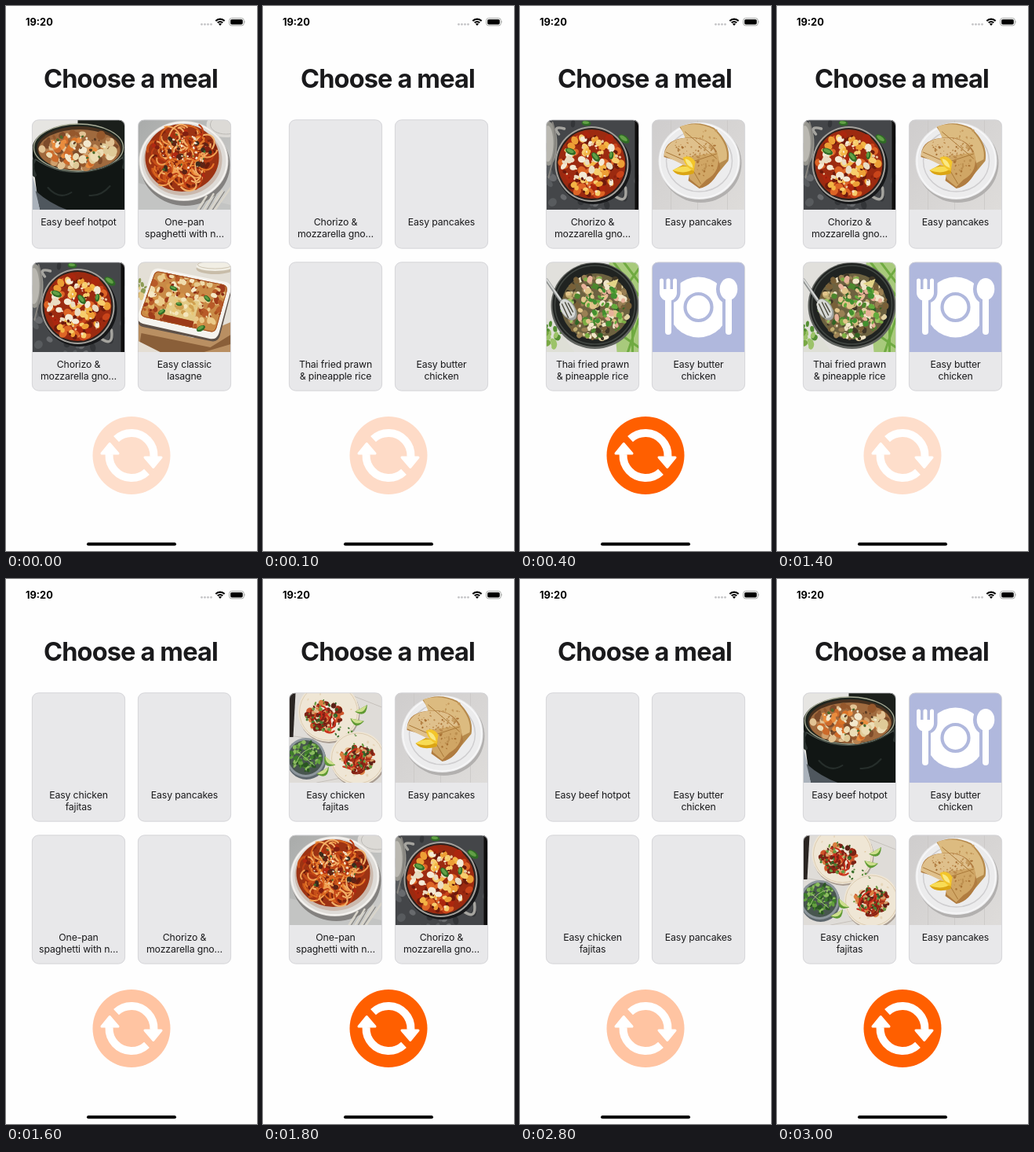
Write an HTML page with a canvas that moves like this. It is 320 by 693 pixels and loops after 3100 ms.

```html
<!DOCTYPE html>
<html lang="en">
<head>
<meta charset="utf-8">
<title>Choose a meal</title>
<style>
  html, body { margin: 0; width: 100%; height: 100%; overflow: hidden; background: #fefefe; }
  body { position: relative; font-family: Inter, "Liberation Sans", sans-serif; color: #1a1a1c; font-optical-sizing: none; }
  canvas { position: absolute; left: 0; top: 0; width: 320px; height: 693px; }
  div, h1 { position: absolute; margin: 0; text-align: center; }
  h1 { left: -1px; top: 73px; width: 320px; font-size: 32.5px; font-weight: 700; line-height: 40px; letter-spacing: -.85px; white-space: nowrap; }
  #clock { left: 25px; top: 11px; font-size: 12.8px; font-weight: 700; line-height: 20px; color: #000; }
  .cap { width: 119px; font-size: 12.3px; line-height: 15px; letter-spacing: -.14px; white-space: pre; }
</style>
</head>
<body>
<canvas id="stage"></canvas>
<div id="clock">19:20</div>
<h1>Choose a meal</h1>
<script>
const LOOP = 3100, STEP = 100, FADE = 250, LOAD = 170, DIM = 0.2;
const W = 320, H = 693, PIC_W = 118, PIC_H = 114, TAU = Math.PI * 2;
const SLOTS = [[33, 144.5], [168, 144.5], [33, 325.5], [168, 325.5]];

const canvas = document.getElementById('stage');
const ctx = canvas.getContext('2d');
const ratio = window.devicePixelRatio || 1;
canvas.width = W * ratio;
canvas.height = H * ratio;

let seed = 1;
function rnd(a = 0, b = 1) {
  seed = (seed * 1664525 + 1013904223) >>> 0;
  return a + (b - a) * seed / 4294967296;
}
const pick = list => list[Math.floor(rnd(0, list.length))];

function rect(x, y, w, h, color) {
  ctx.fillStyle = color;
  ctx.fillRect(x, y, w, h);
}
function backdrop(from, to) {
  const g = ctx.createLinearGradient(0, 0, PIC_W, PIC_H);
  g.addColorStop(0, from);
  g.addColorStop(1, to);
  rect(0, 0, PIC_W, PIC_H, g);
}
function oval(x, y, rx, ry, color, turn = 0) {
  ctx.fillStyle = color;
  ctx.beginPath();
  ctx.ellipse(x, y, rx, ry, turn, 0, TAU);
  ctx.fill();
}
function ring(x, y, rx, ry, color, width) {
  ctx.strokeStyle = color;
  ctx.lineWidth = width;
  ctx.beginPath();
  ctx.ellipse(x, y, rx, ry, 0, 0, TAU);
  ctx.stroke();
}
function shape(d, color) {
  ctx.fillStyle = color;
  ctx.fill(new Path2D(d));
}
function line(d, color, width) {
  ctx.strokeStyle = color;
  ctx.lineWidth = width;
  ctx.lineCap = ctx.lineJoin = 'round';
  ctx.stroke(new Path2D(d));
}
function round(x, y, w, h, r) {
  ctx.beginPath();
  ctx.roundRect(x, y, w, h, r);
}
function spot(rx, ry) {
  const a = rnd(0, TAU), d = Math.sqrt(rnd());
  return [Math.cos(a) * d * rx, Math.sin(a) * d * ry];
}
function scatter(n, x, y, rx, ry, colors, min, max) {
  for (let i = 0; i < n; i++) {
    const [dx, dy] = spot(rx, ry), r = rnd(min, max);
    oval(x + dx, y + dy, r, r * rnd(0.5, 0.95), pick(colors), rnd(0, 3));
  }
}
function strands(n, x, y, rx, ry, colors, width) {
  for (let i = 0; i < n; i++) {
    const [dx, dy] = spot(rx, ry), a = rnd(0, TAU), r = rnd(6, 17);
    ctx.strokeStyle = pick(colors);
    ctx.lineWidth = width;
    ctx.beginPath();
    ctx.ellipse(x + dx, y + dy, r, r * 0.75, rnd(0, 3), a, a + rnd(1.2, 3.2));
    ctx.stroke();
  }
}
function leaf(x, y, size, turn) {
  oval(x, y, size, size * 0.55, '#2f6b25', turn);
  oval(x - 0.5, y - 0.8, size * 0.7, size * 0.3, '#62a046', turn);
}
function lime(x, y, turn) {
  ctx.save();
  ctx.translate(x, y);
  ctx.rotate(turn);
  shape('M-9 -3 Q0 12 9 -3Z', '#5f9a33');
  shape('M-8 -3 Q0 6 8 -3Z', '#cfdf8e');
  ctx.restore();
}

function hotpot() {
  rect(0, 0, 118, 114, '#e6e5e2');
  shape('M58 0 H118 V40 Q96 8 58 5Z', '#1b1f1b');
  shape('M0 70 L12 114 H0Z', '#aab2bb');
  shape('M0 40 Q4 88 10 114 H118 V36Z', '#111614');
  shape('M4 90 L10 114 H44 Q22 106 4 90Z', '#4f575e');
  line('M2 52 Q-3 58 3 70 M114 44 Q121 50 117 60', '#2a322f', 5);
  oval(59, 36, 59, 31, '#20261f');
  ring(59, 35, 57, 30, '#a9ad98', 1.3);
  oval(60, 36, 54, 28, '#48311f');
  oval(60, 38, 52, 26, '#a06a3e');
  scatter(90, 60, 38, 48, 23, ['#b98352', '#d0a06c', '#7d4b2a', '#e2c394', '#95582c'], 2, 6);
  scatter(22, 60, 40, 43, 18, ['#da7327', '#e98c3d', '#cd6a2a'], 3.5, 6.5);
  scatter(20, 60, 40, 43, 18, ['#ecdcb4', '#dfca98', '#f3e8cd'], 4, 7);
  scatter(30, 60, 36, 40, 18, ['#5a3a22', '#4c6b2c', '#f2e7cd'], 0.8, 2.2);
  line('M4 50 Q56 84 115 48', '#4d5650', 1.2);
  line('M20 86 Q34 102 50 92 M73 96 Q88 97 99 84', '#262e2b', 2);
}

function spaghetti() {
  backdrop('#a9abaa', '#cfcfcd');
  shape('M0 80 L118 108 V114 H0Z', '#c3c4c3');
  oval(112, 6, 25, 16, '#dcdad6');
  ring(112, 6, 20, 12, '#bab8b4', 1);
  oval(60, 57, 57, 52, '#83817f');
  oval(58, 52, 57, 51, '#dedbd7');
  ring(58, 52, 55, 49, '#f4f2ef', 2);
  oval(57, 51, 50, 45, '#cbb9ad');
  oval(56, 48, 47, 43, '#9c3313');
  scatter(30, 56, 48, 42, 38, ['#6b1c0c', '#b92f12'], 2, 5);
  strands(70, 56, 48, 35, 32, ['#7e230e', '#a8330f', '#c65019'], 3);
  strands(110, 56, 48, 36, 33, ['#e67b2c', '#f0a052', '#d9661f', '#bd3f15', '#f3b068'], 2);
  scatter(26, 56, 47, 40, 36, ['#811f11', '#5e2315', '#b02812', '#3b2a1c'], 2, 4.5);
  scatter(38, 57, 42, 28, 24, ['#f7ead4', '#eed9bc'], 0.7, 1.9);
  scatter(12, 57, 45, 34, 30, ['#3f6a2a'], 0.8, 1.8);
  line('M76 114 L87 97 M84 114 L96 94 M92 114 L107 90 M98 114 L118 86', '#d9d5cb', 2.4);
  line('M79 114 L90 97 M88 114 L99 95 M95 114 L110 91', '#77736c', 1);
}

function chorizo() {
  rect(0, 0, 118, 114, '#444649');
  scatter(60, 59, 57, 75, 70, ['#585b5e', '#333538', '#686a6d'], 2, 7);
  rect(113, 0, 5, 114, '#0e0d0d');
  oval(3, 30, 11, 28, '#97968f');
  oval(2, 30, 7, 23, '#bab8b1');
  line('M8 3 Q15 25 8 52 L3 73', '#85837e', 2);
  line('M88 97 Q104 108 101 86 M16 18 Q7 7 23 11', '#a5a49f', 3.5);
  oval(60, 59, 48, 48, '#17181a');
  oval(58, 56, 47, 48, '#a2a19c');
  oval(58, 56, 45, 46, '#2c211e');
  oval(58, 56, 43, 44, '#9c2a10');
  scatter(70, 58, 56, 39, 40, ['#c9441a', '#6f1a0c', '#dd6526', '#ab260e'], 2.5, 6);
  scatter(42, 58, 56, 38, 38, ['#f3b545', '#ed9f35', '#f7cd6d'], 3, 5.5);
  scatter(20, 58, 56, 36, 36, ['#f4ead6', '#eadcc2'], 3, 5.5);
  scatter(50, 58, 56, 39, 39, ['#e9c9a0', '#5f160a', '#f7e4c4', '#8d200d'], 0.8, 2.2);
  leaf(31, 40, 7, 0.4);
  leaf(63, 47, 7, 0.9);
  leaf(83, 45, 5, 1.7);
  leaf(51, 4, 6, 0.1);
  leaf(99, 24, 8, 0.6);
}

function lasagne() {
  rect(0, 0, 118, 114, '#e3dfd6');
  shape('M0 78 L70 96 L118 76 V114 H0Z', '#b98f62');
  shape('M4 90 L92 108 L118 92 V104 L84 114 H0Z', '#8a5f39');
  shape('M0 100 L28 114 H0Z', '#e4ded4');
  oval(98, 8, 24, 7, '#c8bda9');
  oval(98, 5, 24, 6, '#f1eee4');
  ring(98, 3, 22, 5, '#cfc6b3', 1);
  scatter(12, 4, 33, 6, 13, ['#cfa965', '#8d9b53', '#e1c887'], 2, 4);
  shape('M16 20 Q19 9 28 11 L112 28 Q120 30 118 40 L104 94 Q101 102 92 100 L6 82 Q-2 80 0 70Z', '#5e5148');
  shape('M16 15 Q19 6 28 8 L112 25 Q120 27 118 36 L103 90 Q100 99 91 97 L6 78 Q-2 76 0 67Z', '#f5f3ee');
  const top = 'M20 16 Q22 10 29 12 L108 28 Q115 30 113 37 L100 83 Q98 90 91 88 L9 70 Q2 68 4 62Z';
  shape(top, '#c98a46');
  ctx.save();
  ctx.clip(new Path2D(top));
  scatter(130, 59, 50, 57, 40, ['#dfae62', '#b85a28', '#ebc988', '#a03c1b', '#d39348'], 2, 6);
  scatter(55, 57, 46, 50, 32, ['#f0dcac', '#e6ca8e', '#f5e8c6'], 1.5, 4.5);
  scatter(45, 59, 49, 53, 37, ['#8a2e16', '#a9501f'], 1, 2.8);
  shape('M40 42 L78 50 L71 75 L33 66Z', '#e3ca86');
  shape('M33 66 L71 75 L69 84 L29 73Z', '#9c3a18');
  scatter(32, 56, 57, 19, 12, ['#f4e5ba', '#d0a050', '#e8c777'], 1.5, 4);
  line(top, '#a24a1e', 2);
  ctx.restore();
  leaf(45, 33, 5, 0.4);
  leaf(30, 63, 5, -0.6);
  leaf(88, 46, 5, 0.8);
  leaf(80, 84, 6, -0.5);
  leaf(52, 53, 4, 0.2);
}

function pancakes() {
  backdrop('#cfcdcd', '#dedcda');
  line('M24 0 V114 M58 0 V114 M96 0 V114', '#cac7c6', 0.8);
  oval(62, 55, 52, 50, '#b2b0af');
  oval(60, 52, 52, 49, '#ececed');
  ring(60, 52, 42, 39, '#cfced0', 1.5);
  ring(60, 52, 50, 47, '#f8f8f9', 1.5);
  shape('M35 9 Q56 -1 79 10 Q101 30 97 52 L82 70 L58 42Z', '#b68a4c');
  shape('M36 8 Q58 1 79 12 Q98 32 95 50 L79 58 L43 25Z', '#dcbb80');
  shape('M15 47 Q15 26 39 23 Q68 18 82 39 L87 61 Q77 84 60 87 L46 77 L50 57Z', '#b07c40');
  shape('M15 45 Q18 26 40 23 Q68 20 79 38 L83 48 L46 60Z', '#dfc08c');
  shape('M43 47 L83 41 Q89 65 69 76 L60 85 L48 75Z', '#d0a665');
  line('M18 41 L48 54 L82 43 M48 57 L62 81 M42 15 L82 49', '#a97838', 1);
  scatter(44, 54, 35, 28, 13, ['#a87034', '#bd8c4f'], 0.5, 1.5);
  scatter(26, 68, 58, 12, 15, ['#ab7536', '#bd9050'], 0.6, 1.8);
  scatter(22, 74, 24, 13, 13, ['#b98a4a', '#c59a5c'], 0.6, 1.8);
  shape('M26 64 Q34 74 53 68 L54 61 L39 57Z', '#dba514');
  shape('M26 64 Q38 56 54 61 Q44 70 26 64Z', '#f8dc55');
  shape('M39 48 Q48 43 55 53 L53 65 Q43 61 39 48Z', '#f3c52a');
  shape('M42 49 Q51 51 52 61 Q43 58 42 49Z', '#fae984');
}

function prawnRice() {
  rect(0, 0, 118, 114, '#e1e0dc');
  shape('M80 0 H118 V114 H90Z', '#a8ca7c');
  line('M86 0 L118 42 M99 0 L118 25 M118 8 L98 36 M118 72 L104 114 M110 56 V114 M98 94 L118 108', '#6faa41', 3);
  shape('M0 70 L20 92 L36 114 H0Z', '#dedfd6');
  scatter(15, 9, 91, 11, 17, ['#79a944', '#548f32', '#9cc369'], 2, 5);
  oval(62, 55, 56, 55, '#60635f');
  oval(62, 54, 54, 53, '#202321');
  ring(62, 54, 51, 50, '#414642', 1.5);
  oval(63, 56, 44, 42, '#6d6240');
  scatter(160, 63, 56, 43, 42, ['#e2d2a3', '#c0ad70', '#786038', '#efe4c6', '#9a8054', '#3f3625'], 1.5, 4.5);
  scatter(50, 63, 57, 42, 40, ['#4c872d', '#7cae44', '#326424', '#9bc260'], 1.5, 4.5);
  scatter(38, 63, 55, 39, 38, ['#f0e5c8', '#e2c58b', '#e8b29a'], 2.5, 5);
  scatter(24, 74, 57, 22, 27, ['#439030', '#64aa3c'], 2, 4.5);
  shape('M76 27 L92 21 L88 32Z', '#e3d487');
  line('M0 22 L18 48', '#8c8f8e', 4);
  line('M0 21 L18 47', '#d7d9d7', 2);
  oval(28, 60, 9, 15, '#9fa29f', -0.55);
  oval(27, 59, 8, 13, '#d8dad7', -0.55);
  line('M20 53 L28 70 M24 51 L32 67 M28 52 L34 63', '#4e4d40', 1.5);
}

function fajita(x, y, rx, ry, fx, fy) {
  oval(x + 1, y + 2, rx, ry, '#a99d92');
  oval(x, y, rx, ry, '#efe6d5');
  ring(x, y, rx - 2, ry - 2, '#dccbb0', 1);
  scatter(16, x, y, rx * 0.8, ry * 0.8, ['#dfc8a0', '#e6d5b8'], 1, 2.2);
  scatter(60, fx, fy, 22, 18, ['#a9301a', '#cf552a', '#7a2214', '#d97f40'], 2, 5);
  scatter(26, fx, fy, 20, 16, ['#d7a06b', '#e3ba88', '#5c2117'], 1.5, 3.5);
  strands(10, fx, fy, 12, 10, ['#c92f1c', '#8a2213'], 2);
  scatter(34, fx, fy, 24, 20, ['#487f32', '#6a9c43', '#2f6127'], 1, 2.6);
}

function fajitas() {
  rect(0, 0, 118, 114, '#dfdcd8');
  line('M72 0 L118 18 M0 54 L118 72 M35 114 L118 98', '#c6c1bb', 1);
  shape('M0 0 H8 L5 56 H0Z', '#2a2522');
  fajita(50, 24, 39, 38, 45, 29);
  fajita(87, 83, 35, 34, 87, 84);
  oval(22, 85, 25, 25, '#5f686e');
  oval(21, 82, 25, 25, '#8d969c');
  oval(21, 82, 22, 22, '#48564f');
  scatter(90, 21, 80, 19, 19, ['#3f7c2c', '#64a03f', '#2a5622', '#8bbd5f'], 1.2, 3.5);
  line('M8 90 Q16 70 34 69 M10 74 L32 92', '#9fc674', 1);
  lime(93, 22, -0.5);
  lime(86, 37, 0.2);
  lime(44, 101, -0.5);
  lime(50, 88, 0.7);
  scatter(9, 74, 50, 18, 8, ['#5a8e3c', '#3e7230'], 0.8, 2);
}

function placeholder() {
  const bg = '#b0b8dd';
  const fork = 'M12 23 V38 Q12 45 20.5 45 Q29 45 29 38 V23 M20.5 23 V88';
  rect(0, 0, 118, 114, bg);
  oval(59, 57, 38.5, 38.5, '#fff');
  ring(59, 57, 17, 17, bg, 4.2);
  line(fork, bg, 14);
  line('M97.5 40 V88', bg, 16);
  oval(97.5, 34, 16, 19, bg);
  line(fork, '#fff', 5);
  line('M20.5 46 V88 M97.5 42 V88', '#fff', 8);
  shape('M10 34 H31 Q32 49 20.5 49 Q9 49 10 34Z', '#fff');
  oval(97.5, 34, 11.3, 14, '#fff');
}

const MEALS = {
  hotpot: ['Easy beef hotpot', hotpot],
  spaghetti: ['One-pan\nspaghetti with n…', spaghetti],
  chorizo: ['Chorizo &\nmozzarella gno…', chorizo],
  lasagne: ['Easy classic\nlasagne', lasagne],
  pancakes: ['Easy pancakes', pancakes],
  rice: ['Thai fried prawn\n& pineapple rice', prawnRice],
  butter: ['Easy butter\nchicken', placeholder],
  fajitas: ['Easy chicken\nfajitas', fajitas]
};

// Each menu appears when the button is released; pictures load a little later.
const MENUS = [
  { release: -1000, press: 0, meals: ['hotpot', 'spaghetti', 'chorizo', 'lasagne'] },
  { release: 75, press: 1400, meals: ['chorizo', 'pancakes', 'rice', 'butter'] },
  { release: 1520, press: 2700, meals: ['fajitas', 'pancakes', 'spaghetti', 'chorizo'] },
  { release: 2720, press: LOOP, meals: ['hotpot', 'butter', 'fajitas', 'pancakes'] }
];

const captions = SLOTS.map(([x, y]) => {
  const el = document.createElement('div');
  el.className = 'cap';
  el.style.left = x + 'px';
  el.style.top = y + 122.5 + 'px';
  document.body.append(el);
  return el;
});

function statusBar() {
  for (let i = 0; i < 4; i++) oval(249.5 + i * 4, 23.3, 1.4, 1.4, '#c4c4c6');
  ctx.strokeStyle = '#000';
  ctx.lineCap = 'butt';
  ctx.lineWidth = 2.1;
  for (const r of [4.6, 8]) {
    ctx.beginPath();
    ctx.arc(273, 24.6, r, -Math.PI * 0.75, -Math.PI * 0.25);
    ctx.stroke();
  }
  shape('M273 25 L270.9 22.8 Q273 21 275.1 22.8Z', '#000');
  ctx.strokeStyle = '#a3a5a3';
  ctx.lineWidth = 1;
  round(284.7, 15.5, 18.6, 9.4, 2.8);
  ctx.stroke();
  ctx.fillStyle = '#000';
  round(286.2, 17, 15.6, 6.4, 1.6);
  ctx.fill();
  shape('M304.3 18.6 Q306 20.2 304.3 21.8Z', '#a3a5a3');
  ctx.fillStyle = '#000';
  round(103, 682.3, 114, 4, 2);
  ctx.fill();
}

function card(x, y, paint) {
  ctx.save();
  round(x, y, 119, 164, 8.5);
  ctx.fillStyle = '#e8e8ea';
  ctx.fill();
  if (paint) {
    ctx.save();
    ctx.clip();
    ctx.translate(x + 0.5, y + 0.5);
    ctx.beginPath();
    ctx.rect(0, 0, PIC_W, PIC_H);
    ctx.clip();
    seed = 77;
    paint();
    ctx.restore();
  }
  round(x + 0.4, y + 0.4, 118.2, 163.2, 8.1);
  ctx.strokeStyle = '#d3d3d6';
  ctx.lineWidth = 0.85;
  ctx.stroke();
  ctx.restore();
}

function button(alpha) {
  ctx.save();
  ctx.globalAlpha = alpha;
  oval(160, 571.5, 49.5, 49.5, '#ff5f00');
  ctx.globalAlpha = 1;
  ctx.translate(160, 571.5);
  for (let i = 0; i < 2; i++) {
    ctx.strokeStyle = '#fff';
    ctx.lineCap = 'butt';
    ctx.lineWidth = 10;
    ctx.beginPath();
    ctx.arc(0, 0, 28.5, -Math.PI * 0.74, 0.05);
    ctx.stroke();
    const head = 'M17 2.5 H38 L27.8 15Z';
    shape(head, '#fff');
    line(head, '#fff', 3);
    ctx.rotate(Math.PI);
  }
  ctx.restore();
}

function buttonAlpha(t, menu) {
  if (t >= menu.press) return DIM;
  const p = Math.min(1, (t - menu.release) / FADE);
  const eased = p < 0.5 ? 2 * p * p : 1 - 2 * (1 - p) * (1 - p);
  return DIM + (1 - DIM) * eased;
}

function draw(t) {
  const menu = MENUS.filter(m => m.release <= t).pop();
  const loaded = t >= menu.release + LOAD;
  ctx.setTransform(ratio, 0, 0, ratio, 0, 0);
  rect(0, 0, W, H, '#fefefe');
  statusBar();
  SLOTS.forEach(([x, y], i) => {
    const [name, paint] = MEALS[menu.meals[i]];
    card(x, y, loaded && paint);
    captions[i].textContent = name;
  });
  button(buttonAlpha(t, menu));
}

let shown = -1;
const start = performance.now();
function tick() {
  const t = Math.floor((performance.now() - start) % LOOP / STEP) * STEP;
  if (t !== shown) draw(shown = t);
  requestAnimationFrame(tick);
}
tick();
</script>
</body>
</html>
```
